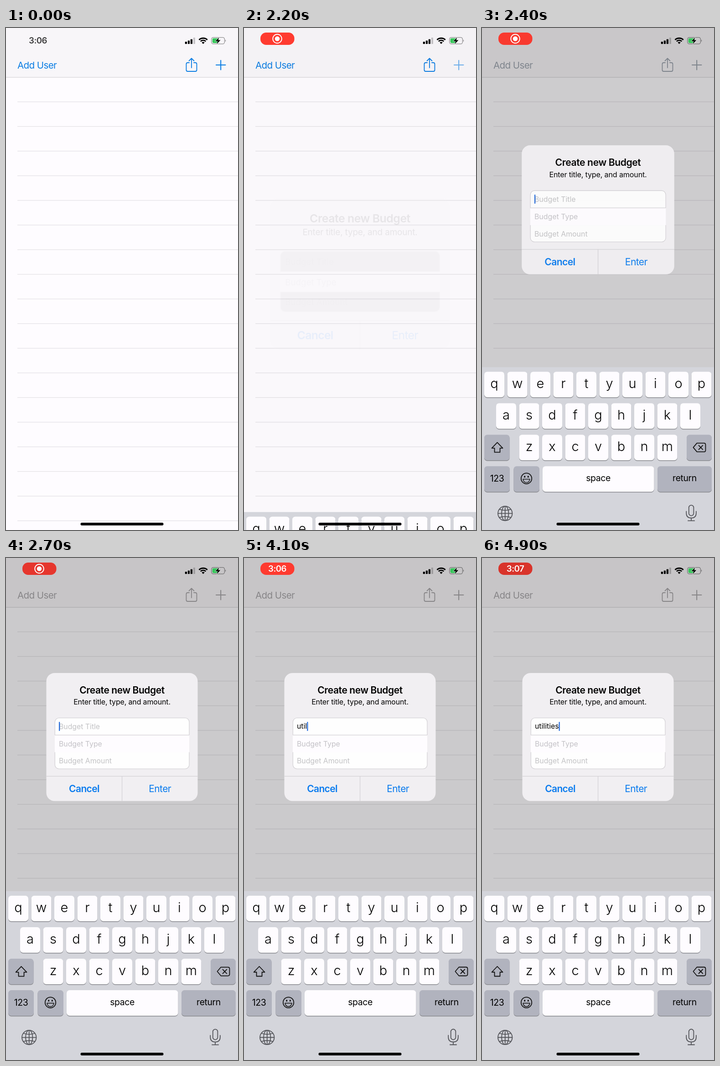
An HTML page for the animation above (5000 ms loop, 509 by 1100 pixels).

```html
<!DOCTYPE html>
<html lang="en">
<head>
<meta charset="utf-8">
<title>Budget prompt</title>
<style>
  html, body { margin: 0; width: 100%; height: 100%; overflow: hidden; background: #fefcff; }
  svg { display: block; width: 100vw; height: 100vh; font-family: Inter, Roboto, sans-serif; }
  .large { font-size: 21px; letter-spacing: -.03em; }
  .bar { font-size: 20.6px; letter-spacing: -.03em; }
  .title { font-size: 21px; font-weight: 600; letter-spacing: -.02em; }
  .bold { font-weight: 600; }
  .clock { font-size: 18.7px; font-weight: 600; letter-spacing: -.03em; }
  .note { font-size: 16px; letter-spacing: -.01em; }
  .field { font-size: 15.8px; }
  .hint { fill: #3c3c43; fill-opacity: .3; }
  .mid { text-anchor: middle; }
  .letter { font-size: 29px; font-weight: 300; }
  .label { font-size: 19.4px; letter-spacing: -.02em; }
  .line { fill: none; stroke-linecap: round; stroke-linejoin: round; }
  #popup path { fill: #fefcff; filter: drop-shadow(0 1px 2px rgba(0, 0, 0, .35)); }
  #popup text { font-size: 43px; font-weight: 300; }
</style>
</head>
<body>
<svg id="stage" viewBox="0 0 509 1100"></svg>
<script>
const LOOP = 5000, STEP = 100;
const BLUE = [10, 125, 227], GREY = [168, 166, 169];
const KEY = { width: 44, height: 56, pitch: 50.5 };
const ROWS = [
  { keys: 'qwertyuiop', x: 27, y: 740 },
  { keys: 'asdfghjkl', x: 53, y: 809 },
  { keys: 'zxcvbnm', x: 103.5, y: 878 }
];
const WORD = 'utilities';
const PRESSES = [3200, 3500, 3700, 4000, 4200, 4300, 4500, 4600, 4700];
const PRESS_TIME = 100;

const clamp = v => Math.max(0, Math.min(1, v));
const ramp = (t, from, to) => clamp((t - from) / (to - from));
const mix = (a, b, p) => a + (b - a) * p;
const rgb = c => `rgb(${c.map(Math.round)})`;

const rect = (x, y, w, h, r, attrs) =>
  `<rect x="${x}" y="${y}" width="${w}" height="${h}" rx="${r}" ${attrs}/>`;
const text = (x, y, cls, str, attrs = '') =>
  `<text x="${x}" y="${y}" class="${cls}" ${attrs}>${str}</text>`;
const path = (d, attrs = '') => `<path class="line" d="${d}" ${attrs}/>`;

function keyCap(x, y, w, fill) {
  return rect(x, y + 1.5, w, KEY.height, 6.5, 'fill="#898a8f"') +
         rect(x, y, w, KEY.height, 6.5, `fill="${fill}"`);
}

function tablePart() {
  let rows = '';
  for (let y = 161; y < 1100; y += 54) rows += rect(25, y, 484, 1.4, 0, 'fill="#e6e4e8"');
  return rect(0, 0, 509, 1100, 0, 'fill="#fefcff"') + rows +
    rect(0, 0, 509, 108, 0, 'fill="#f8f6f9"') +
    rect(0, 107.5, 509, 1.3, 0, 'fill="#d9d7da"') +
    `<g id="nav">${text(25, 88.5, 'bar', 'Add User', 'fill="currentColor"')}
      <g stroke="currentColor" stroke-width="1.8">
        ${path('M402 76H398.5Q395.5 76 395.5 79V92Q395.5 95 398.5 95H415.5Q418.5 95 418.5 92V79Q418.5 76 415.5 76H412M407 87V66.5M401.5 72L407 66.5L412.5 72')}
        <g id="plus">${path('M461 81H481.5M471.2 71V91.5', 'stroke-width="2.1"')}</g>
      </g></g>`;
}

// A quarter-circle wave above the wifi symbol's foot.
function wave(radius, width) {
  const d = radius * Math.SQRT1_2, x = 432.6, y = 35 - d;
  return path(`M${x - d} ${y}A${radius} ${radius} 0 0 1 ${x + d} ${y}`,
    `stroke="#000" stroke-width="${width}" style="stroke-linecap:butt"`);
}

function statusPart() {
  const bars = [5, 7.5, 10.5, 14].map((h, i) =>
    rect(392.8 + i * 6, 35 - h, 4.2, h, 1, `fill="#000" opacity="${i < 3 ? 1 : .2}"`)).join('');
  const wifi = wave(12.8, 3) + wave(8.1, 2.8) + '<path d="M429.4 31.8A4.5 4.5 0 0 1 435.8 31.8L432.6 35Z"/>';
  const bolt = '<path d="M467.5 20.5L459.3 29H464.3L462.3 35.3L470.6 26.6H465.6Z" stroke="#fff" stroke-width="1.2" stroke-opacity=".8" paint-order="stroke"/>';
  const battery = rect(450.8, 20.6, 28.7, 14.3, 4.2, 'fill="none" stroke="#000" stroke-opacity=".42" stroke-width="1.3"') +
    '<path d="M481 25.3Q483.6 27.7 481 30.2Z" opacity=".45"/>' +
    rect(452.8, 22.5, 13.5, 10.5, 2.4, 'fill="#35c759"') + bolt;
  return bars + wifi + battery + text(70, 34.3, 'clock mid', '3:06', 'id="plainClock"') +
    `<g id="pill">${rect(36, 10, 74.5, 27, 12.5, 'id="pillShape"')}
      <g id="recording"><circle cx="73" cy="23.5" r="9.8" fill="none" stroke="#fff" stroke-width="1.9"/>
        <circle cx="73" cy="23.5" r="5.2" fill="#fff"/></g>
      ${text(73, 30.2, 'clock mid', '3:06', 'id="pillClock" fill="#fff"')}</g>`;
}

function alertPart() {
  const hint = (y, str, attrs) => text(116, y, 'field hint', str, attrs);
  return rect(88.5, 252, 332, 280.5, 18, 'fill="#f1eff2"') +
    text(254.5, 296.6, 'title mid', 'Create new Budget') +
    text(254.5, 321, 'note mid', 'Enter title, type, and amount.') +
    rect(107.3, 350.5, 294.7, 111.5, 9, 'id="fields" stroke="#cfcdd1" stroke-width="1.1"') +
    rect(106.6, 388, 296, 37.5, 0, 'fill="#fefcff"') +
    rect(107, 387.4, 295, 1.2, 0, 'fill="#d3d1d5"') +
    hint(375.4, 'Budget Title', 'id="titleHint"') +
    hint(413, 'Budget Type') + hint(450, 'Budget Amount') +
    text(116, 374.4, 'field', '', 'id="typed"') +
    rect(116, 359, 2.3, 20, 1, 'id="caret" fill="#2a6fdc"') +
    rect(88.5, 477.7, 332, 1.1, 0, 'fill="#d0ced2"') +
    rect(254, 478, 1.1, 54.5, 0, 'fill="#d0ced2"') +
    text(171.5, 513.3, 'large bold mid', 'Cancel', 'fill="#0a7bee"') +
    text(337.7, 513.3, 'large mid', 'Enter', 'fill="#0a7bee"');
}

function keyboardPart() {
  const dark = '#b1b3be', light = '#fefcff';
  const letters = ROWS.map(row => [...row.keys].map((k, i) => {
    const x = row.x + i * KEY.pitch;
    return keyCap(x - KEY.width / 2, row.y, KEY.width, light) + text(x, row.y + 36, 'letter mid', k);
  }).join('')).join('');
  const specials = keyCap(5, 878, 55.5, dark) + keyCap(449, 878, 55, dark) +
    keyCap(5, 947, 56, dark) + keyCap(69.5, 947, 56.5, dark) +
    keyCap(133, 947, 244.5, light) + keyCap(385, 947, 119, dark) +
    text(33, 981, 'label mid', '123') + text(255, 979.5, 'label mid', 'space') +
    text(444.5, 979.5, 'label mid', 'return');
  const icons = `<g stroke="#111" stroke-width="1.8">
      ${path('M33.5 895L45.5 907.5H39.5V916.5H27.5V907.5H21.5Z')}
      ${path('M471.5 896.5H487Q490.5 896.5 490.5 900V912Q490.5 915.5 487 915.5H471.5L463.5 906ZM475.5 901.5L484.3 910.5M484.3 901.5L475.5 910.5')}
      <circle cx="97.5" cy="974" r="11.7" fill="none"/>
      ${path('M90 975.5H105Q103.5 983 97.5 983Q91.5 983 90 975.5Z', 'stroke-width="1.4"')}
    </g>
    <ellipse cx="93.7" cy="970" rx="1.4" ry="2"/><ellipse cx="101.3" cy="970" rx="1.4" ry="2"/>
    <g class="line" stroke="#54555a" stroke-width="1.8">
      <circle cx="50.7" cy="1050.5" r="15.7"/><ellipse cx="50.7" cy="1050.5" rx="7.7" ry="15.7"/>
      <path d="M35 1050.5H66.4M50.7 1035V1066M38.5 1041.5Q50.7 1046 63 1041.5M38.5 1059.5Q50.7 1055 63 1059.5"/>
      <rect x="453.8" y="1032.5" width="10.6" height="23" rx="5.3"/>
      <path d="M448.3 1046V1050Q448.3 1060.5 459.1 1060.5Q469.9 1060.5 469.9 1050V1046M459.1 1060.5V1066.5M452 1066.5H466.2"/>
    </g>`;
  return rect(0, 730, 509, 370, 0, 'fill="#d4d5db"') + letters + specials + icons;
}

// Balloon above a pressed key, drawn around the key's top centre.
const POPUP = 'M-29 -74H29Q38 -74 38 -65V-24C38 -10 22 -8 22 6V50Q22 56 16 56H-16Q-22 56 -22 50V6C-22 -8 -38 -10 -38 -24V-65Q-38 -74 -29 -74Z';

const stage = document.getElementById('stage');
stage.innerHTML = tablePart() +
  rect(0, 0, 509, 1100, 0, 'id="dim" fill="#000"') + statusPart() +
  `<g id="alert">${alertPart()}</g><g id="keyboard">${keyboardPart()}</g>
   <g id="popup"><path d="${POPUP}"/><text class="mid" y="-28"></text></g>` +
  rect(163.5, 1084, 182, 6, 3, 'fill="#000"');

const part = id => document.getElementById(id);
const set = (id, name, value) => part(id).setAttribute(name, value);
const fade = (id, value) => set(id, 'opacity', value);

function spring(t, start) {
  const x = Math.max(0, t - start) * .023;
  return 1 - (1 + x) * Math.exp(-x);
}

function renderStatus(t) {
  const toClock = ramp(t, 3200, 3500);
  const glow = .5 + .5 * Math.cos((t - 2150) / 1000 * Math.PI);
  fade('plainClock', 1 - ramp(t, -100, 300));
  fade('pill', ramp(t, 0, 400));
  set('pillShape', 'fill', rgb([mix(211, 255, glow), mix(51, 59, glow), mix(42, 48, glow)]));
  fade('recording', 1 - toClock);
  fade('pillClock', toClock);
  part('pillClock').textContent = t < 4600 ? '3:06' : '3:07';
}

function renderPrompt(t) {
  const p = spring(t, 2181);
  fade('dim', .2 * p);
  part('nav').style.color = rgb(BLUE.map((c, i) => mix(c, GREY[i], p * p)));
  fade('plus', t < 2000 ? 1 : mix(.3, 1, ramp(t, 2100, 2350)));
  fade('alert', p);
  set('alert', 'transform',
    `translate(254.5 ${mix(550, 392, p)}) scale(${mix(1.2, 1, p)}) translate(-254.5 -392)`);
  const shade = 254 - 100 * Math.pow(1 - p, 1.4);
  set('fields', 'fill', rgb([shade, shade, shade]));
  set('keyboard', 'transform', `translate(0 ${370 * (1 - spring(t, 2176))})`);
}

function renderTyping(t) {
  const count = PRESSES.filter(start => t >= start + PRESS_TIME).length;
  const typed = part('typed');
  typed.textContent = WORD.slice(0, count);
  fade('titleHint', count ? 0 : 1);
  set('caret', 'x', 116 + (count ? typed.getComputedTextLength() : 0));
  fade('caret', t < 2300 || (t > 2850 && t < 3150) ? 0 : 1);

  const active = PRESSES.findIndex(start => t >= start && t < start + PRESS_TIME);
  const popup = part('popup');
  popup.style.display = active < 0 ? 'none' : '';
  if (active < 0) return;
  const letter = WORD[active];
  const row = ROWS.find(r => r.keys.includes(letter));
  popup.setAttribute('transform', `translate(${row.x + row.keys.indexOf(letter) * KEY.pitch} ${row.y})`);
  popup.querySelector('text').textContent = letter;
}

function render(ms) {
  const t = Math.floor(ms % LOOP / STEP) * STEP;
  renderStatus(t);
  renderPrompt(t);
  renderTyping(t);
}

const began = performance.now();
function tick() {
  render(performance.now() - began);
  requestAnimationFrame(tick);
}
tick();
</script>
</body>
</html>
```
